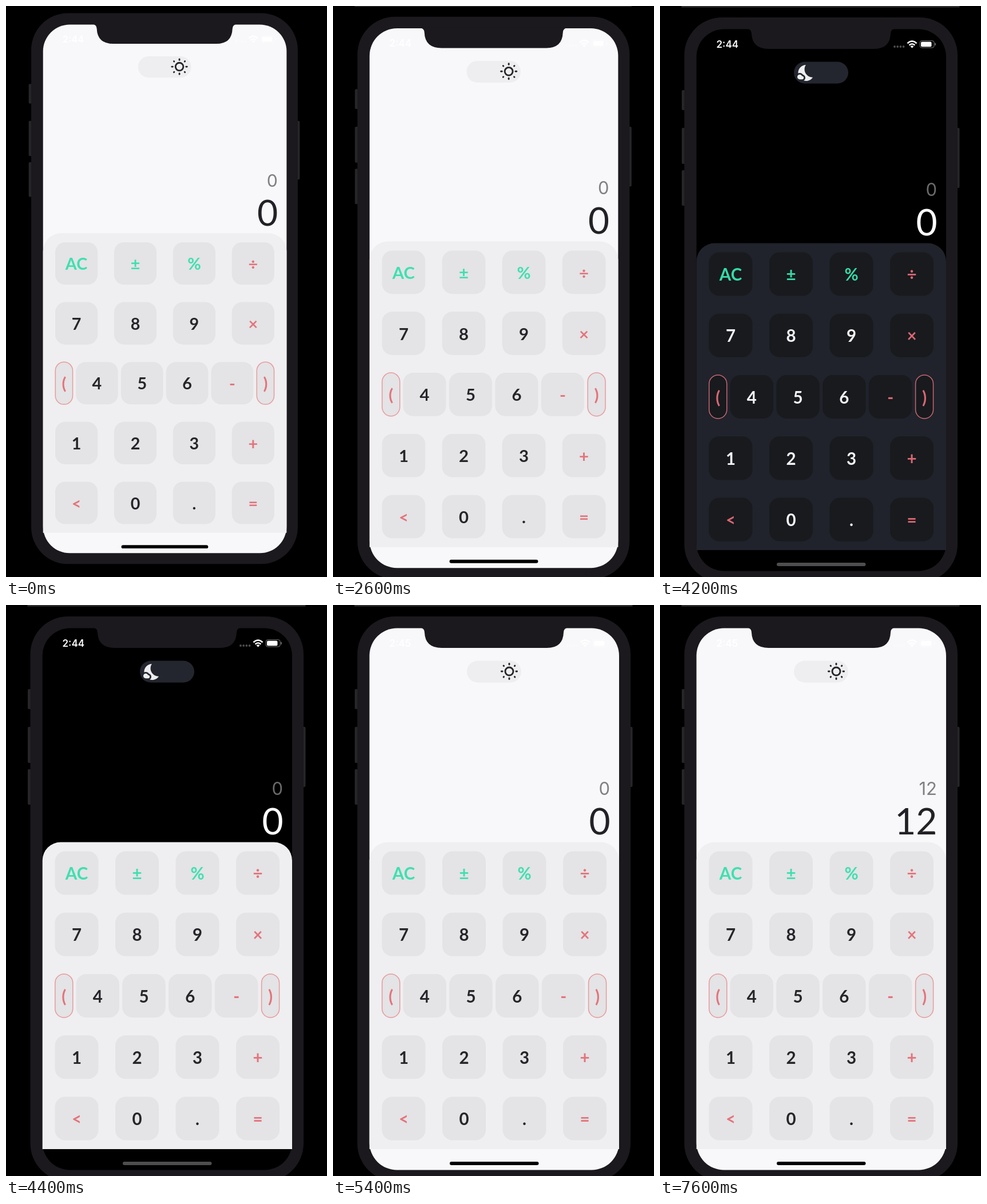
An HTML page that plays this animation: 561 by 998 pixels, repeating every 8000 ms.

```html
<!DOCTYPE html>
<html lang="en">
<head>
<meta charset="utf-8">
<title>Calculator theme switch</title>
<style>
  html, body { margin: 0; height: 100%; overflow: hidden; background: #000; }
  svg { display: block; width: 100vw; height: 100vh; }
  #pad { --panel: #efeef0; --key: #e4e3e5; --digit: #26252a; --fn: #3ee0b0; --op: #e4737b; --rim: #e69a9c; }
  #pad.dark { --panel: #20232b; --key: #181a1e; --digit: #f3f3f4; --fn: #36dba6; --op: #da6772; --rim: #cb6670; }
  #panel { fill: var(--panel); }
  .key rect { fill: var(--key); }
  .key text { font: 700 29.5px Lato, sans-serif; text-anchor: middle; fill: var(--digit); }
  .key.fn text { fill: var(--fn); }
  .key.op text { fill: var(--op); }
  .key.paren rect { stroke: var(--rim); stroke-width: 1.5; }
  .key .press { fill: #000; opacity: 0; }
  #clock { font: 600 17px Inter, sans-serif; }
  #small { font: 400 31px Inter, sans-serif; text-anchor: end; }
  #big { font: 400 64px Lato, sans-serif; text-anchor: end; }
</style>
</head>
<body>
<svg viewBox="0 0 561 998" preserveAspectRatio="none">
  <g id="camera">
    <rect x="37.5" y="-4" width="486" height="6.5" fill="#302f31"/>
    <g fill="#262528">
      <rect x="38" y="147" width="8" height="35" rx="2"/>
      <rect x="38" y="213" width="8" height="63" rx="2"/>
      <rect x="38" y="287" width="8" height="62" rx="2"/>
      <rect x="515" y="213" width="8.5" height="105" rx="2"/>
    </g>
    <rect x="42.5" y="20" width="477.5" height="987" rx="66" fill="#1b191d"/>
    <rect id="screen" x="63.7" y="40.5" width="436.3" height="947" rx="48"/>
    <path d="M150 39Q160 40 160 48Q161 75 190 75H374Q402 75 403 48Q403 40 413 39Z" fill="#1b191d"/>

    <g fill="#fff">
      <text id="clock" x="98.5" y="72.7"></text>
      <g opacity=".3">
        <circle cx="410" cy="71" r="1.9"/><circle cx="415.2" cy="71" r="1.9"/>
        <circle cx="420.4" cy="71" r="1.9"/><circle cx="425.6" cy="71" r="1.9"/>
      </g>
      <g fill="none" stroke="#fff" stroke-width="2.6">
        <path d="M432.5 65.2Q440.5 57.8 448.5 65.2"/>
        <path d="M435.6 68.5Q440.5 64 445.4 68.5"/>
      </g>
      <path d="M437.6 70.4Q440.5 68 443.4 70.4L440.5 73.4Z"/>
      <rect x="454.2" y="60.6" width="25" height="12.4" rx="3.6" fill="none" stroke="#fff" stroke-opacity=".45"/>
      <rect x="456" y="62.4" width="18.5" height="8.8" rx="2"/>
      <rect x="480.4" y="64.6" width="1.6" height="4.4" rx=".8" opacity=".45"/>
    </g>

    <rect id="track" x="234" y="97.5" width="95" height="38" rx="19"/>
    <g id="knob">
      <g id="sun" fill="none" stroke="#26252a" stroke-width="2.9" stroke-linecap="round">
        <circle r="7"/>
      </g>
      <path id="moon" fill="#eeeef0" transform="translate(-16.8 -15.8) scale(1.4)"
        d="M11.1 12.08c-2.33-4.51-.5-8.48.53-10.07C6.27 2.2 1.98 6.59 1.98 12c0 .14.02.28.02.42.62-.27 1.29-.42 2-.42 1.66 0 3.18.83 4.1 2.15 1.67.48 2.9 2.02 2.9 3.85 0 1.52-.87 2.83-2.12 3.51.98.32 2.03.5 3.11.5 3.5 0 6.58-1.8 8.37-4.52-2.36.23-6.98-.97-9.26-5.41zM7 16h-.18C6.4 14.84 5.3 14 4 14c-1.66 0-3 1.34-3 3s1.34 3 3 3h3c1.1 0 2-.9 2-2s-.9-2-2-2z"/>
    </g>

    <text id="small" x="484" y="331.5"></text>
    <text id="big" x="484.5" y="401"></text>

    <g id="pad">
      <path id="panel" d="M63.7 951V446.5a32 32 0 0 1 32-32H468a32 32 0 0 1 32 32V951Z"/>
    </g>
    <rect id="home" x="204" y="973" width="155.5" height="6" rx="3"/>
  </g>
</svg>
<script>
const $ = id => document.getElementById(id);
const LOOP = 8000, STEP = 200;

function add(parent, tag, attrs) {
  const el = document.createElementNS('http://www.w3.org/2000/svg', tag);
  for (const name in attrs) el.setAttribute(name, attrs[name]);
  return parent.appendChild(el);
}

for (let i = 0; i < 8; i++) {
  const diagonal = i % 2;
  add($('sun'), 'path', {
    d: diagonal ? 'M13.3 0H14' : 'M12 0H13.6',
    transform: `rotate(${i * 45})`
  });
}

// Keypad: the middle row squeezes in two narrow bracket keys.
const presses = {};
function addKey(label, x, y, width) {
  const paren = '()'.includes(label);
  const kind = /^[\d.]$/.test(label) ? '' : ['AC', '±', '%'].includes(label) ? 'fn' : 'op';
  const key = add($('pad'), 'g', { class: `key ${kind} ${paren ? 'paren' : ''}` });
  const box = { x, y, width, height: 76, rx: paren ? width / 2 : 18 };
  add(key, 'rect', box);
  if (!paren) presses[label] = add(key, 'rect', { ...box, class: 'press' });
  add(key, 'text', { x: x + width / 2, y: y + 49.5 }).textContent = label;
}
['AC ± % ÷', '7 8 9 ×', '( 4 5 6 - )', '1 2 3 +', '< 0 . ='].forEach((row, r) => {
  const labels = row.split(' '), y = 430.5 + r * 107.25;
  labels.forEach((label, c) => {
    if (labels.length === 4) addKey(label, 85.5 + c * 105.5, y, 76);
    else if (label === '(') addKey(label, 85.8, y, 31);
    else if (label === ')') addKey(label, 446.6, y, 31);
    else addKey(label, 122.5 + (c - 1) * 80.8, y, 75.5);
  });
});

const ramp = (t, start, length) => Math.min(1, Math.max(0, (t - start) / length));
const ease = p => p < .5 ? 4 * p ** 3 : 1 - (2 - 2 * p) ** 3 / 2;
const mix = (a, b, p) => a + (b - a) * p;
const mixColor = (a, b, p) => `rgb(${a.map((v, i) => Math.round(mix(v, b[i], p)))})`;

function draw(t) {
  const zoom = ease(ramp(t, 1950, 1000));
  $('camera').setAttribute('transform',
    `translate(${mix(2.585, 0, zoom)} ${mix(-7.07, 0, zoom)}) scale(${mix(1 / 1.025, 1, zoom)})`);

  // Keys switch at once; background, text and toggle follow at their own pace.
  $('pad').setAttribute('class', t >= 2990 && t < 4400 ? 'dark' : '');
  const night = ramp(t, 3000, 200) - ramp(t, 4416, 200);
  const textNight = ramp(t, 3200, 200) - ramp(t, 4616, 200);
  const fade = ramp(t, 3000, 600) - ramp(t, 4410, 600);
  const slide = ease(ramp(t, 3000, 800)) - ease(ramp(t, 4416, 800));

  $('screen').style.fill = mixColor([248, 247, 250], [0, 0, 0], night);
  $('home').style.fill = mixColor([0, 0, 0], [78, 78, 80], Math.max(0, night * 2 - 1));
  $('small').style.fill = mixColor([128, 127, 130], [106, 106, 106], night);
  $('big').style.fill = mixColor([34, 33, 38], [255, 255, 255], textNight);
  $('track').style.fill = mixColor([238, 237, 239], [36, 38, 47], fade);
  $('knob').setAttribute('transform', `translate(${mix(308, 255.4, slide)} 116)`);
  $('sun').style.opacity = 1 - fade;
  $('moon').style.opacity = fade;

  $('clock').textContent = t < 5000 ? '2:44' : '2:45';
  $('small').textContent = $('big').textContent = t < 6800 ? '0' : t < 7200 ? '1' : '12';
  for (const [label, start] of [['1', 6600], ['2', 7000]])
    presses[label].style.opacity = t < start ? 0 : .06 * (1 - ramp(t, start, 400));
}

function tick() {
  const t = performance.now() % LOOP;
  draw(Math.floor(t / STEP) * STEP);
  requestAnimationFrame(tick);
}
tick();
</script>
</body>
</html>
```
